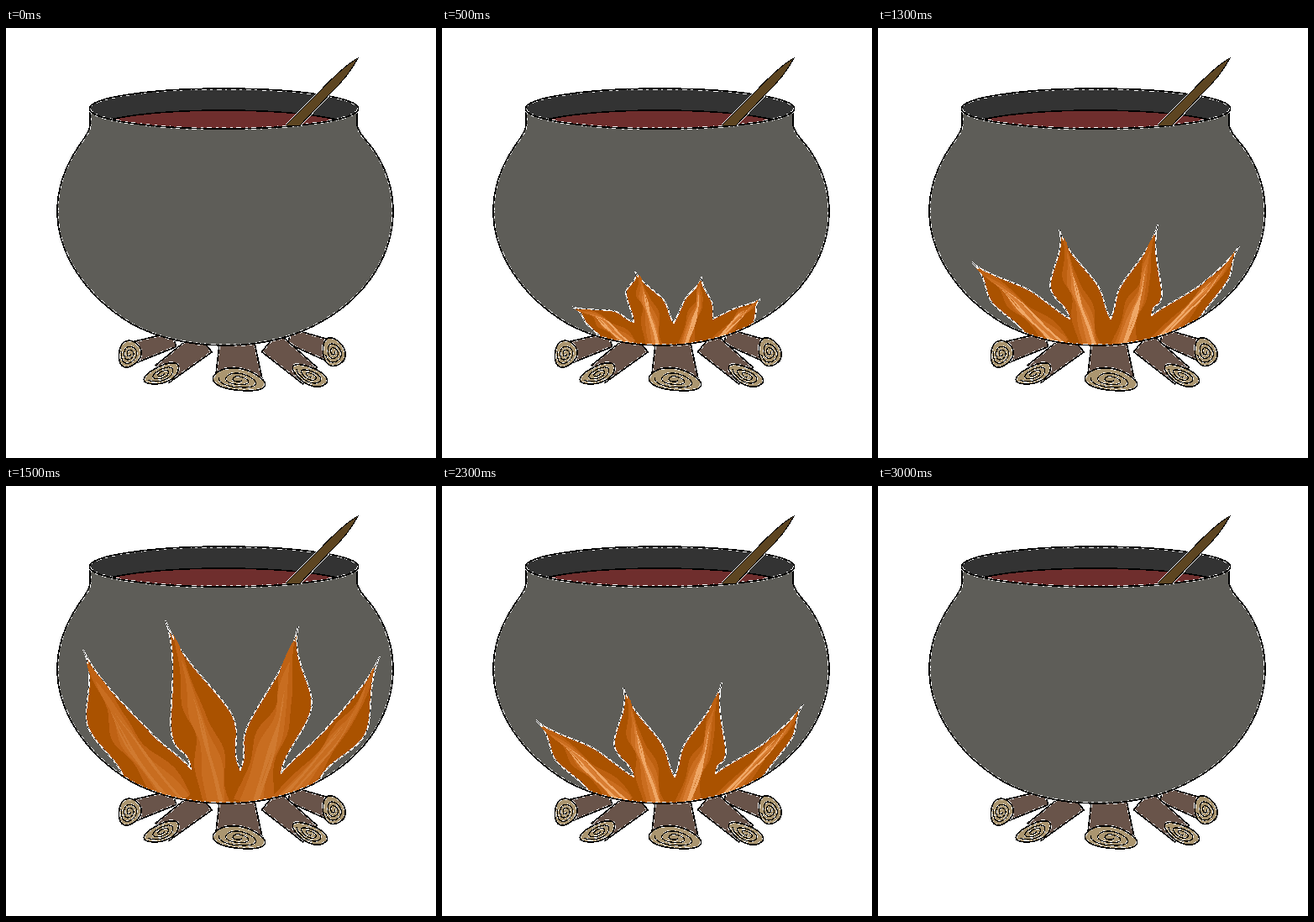
Recreate the animation shown at these times as an HTML page. Size 512 px wide and 512 px high, loop 3.5 s.

```html
<!DOCTYPE html>
<html lang="en">
<head>
<meta charset="utf-8">
<title>Cauldron</title>
<style>
  html, body { margin: 0; width: 100%; height: 100%; overflow: hidden; background: #fff; }
  svg { display: block; width: 100vw; height: 100vh; shape-rendering: crispEdges; }
  .ink, .fleck { fill: none; stroke-linejoin: round; }
  .ink { stroke: #000; stroke-width: 1.6; }
  .fleck { stroke: #fff; stroke-width: 3; stroke-dasharray: 6 4 3 5; }
  .stage { visibility: hidden; animation: 3500ms step-end infinite; }
  #ember { animation-name: ember; }
  #low { animation-name: low; }
  #mid { animation-name: mid; }
  #high { animation-name: high; }
  @keyframes ember {
    0%, 85.7143% { visibility: visible; }
    14.2857%, 100% { visibility: hidden; }
  }
  @keyframes low {
    0%, 28.5714%, 85.7143%, 100% { visibility: hidden; }
    14.2857%, 71.4286% { visibility: visible; }
  }
  @keyframes mid {
    0%, 42.8571%, 71.4286%, 100% { visibility: hidden; }
    28.5714%, 57.1429% { visibility: visible; }
  }
  @keyframes high {
    0%, 57.1429%, 100% { visibility: hidden; }
    42.8571% { visibility: visible; }
  }
</style>
</head>
<body>
<svg viewBox="0 0 512 512">
  <defs>
    <path id="body" d="M100 97V116C99 126 91 133 85 143C70 166 61 190 61 218C61 268 94 319 149 352C184 371 225 378 262 378C304 378 345 368 377 349C430 319 461 270 461 218C461 190 451 164 437 144C429 133 420 126 418 116V97"/>
    <ellipse id="rim" cx="259.5" cy="96" rx="160" ry="24"/>
    <ellipse id="soup" cx="259" cy="122" rx="160" ry="24"/>
    <path id="stick" d="M333 116L372 77Q402 45 419 36Q408 57 388 76L350 116"/>
    <clipPath id="inPot"><use href="#body"/></clipPath>
    <clipPath id="inRim"><use href="#rim"/></clipPath>
  </defs>
  <g id="logs"></g>
  <path id="ember" class="stage" d="M143 346L178 361L165 360Z" fill="#a4561c"/>
  <use href="#body" fill="#5e5d58"/>
  <g id="low" class="stage"></g>
  <g id="mid" class="stage"></g>
  <g id="high" class="stage"></g>
  <use href="#body" class="fleck"/>
  <use href="#body" class="ink"/>
  <use href="#rim" fill="#333"/>
  <g clip-path="url(#inRim)">
    <use href="#soup" fill="#6f2e2d"/>
    <use href="#soup" class="ink"/>
  </g>
  <use href="#rim" class="fleck"/>
  <use href="#rim" class="ink"/>
  <use href="#stick" fill="#5d4521" stroke="#fff" stroke-width="2.6"/>
  <use href="#stick" fill="#5d4521" stroke="#000" stroke-width="1"/>
</svg>
<script>
const $ = id => document.getElementById(id);
const draw = (d, attrs) => `<path d="${d}" ${attrs}/>`;
const fill = color => `fill="${color}"`;
const mix = (a, b, t) => [a[0] + (b[0] - a[0]) * t, a[1] + (b[1] - a[1]) * t];
const line = pts => 'M' + pts.map(p => p.map(v => v.toFixed(1))).join('L');

function seeded(seed) {
  return () => (seed = seed * 16807 % 2147483647) / 2147483647;
}

const outlined = (d, color) =>
  draw(d, fill(color)) + draw(d, 'class="fleck"') + draw(d, 'class="ink"');

// Tapered, wavy band from base to tip, bending through mid.
function band({ base, mid, tip }, width, shift, reach, phase) {
  const left = [], right = [], steps = 24;
  const point = t => {
    const a = mix(base, mid, t), b = mix(mid, tip, t);
    return mix(mix(a, mid, t), mix(mid, b, t), t);
  };
  for (let i = 0; i <= steps; i++) {
    const k = i / steps, t = k * reach, a = point(t), b = point(t + 0.01);
    const len = Math.hypot(b[0] - a[0], b[1] - a[1]) || 1;
    const normal = [(a[1] - b[1]) / len, (b[0] - a[0]) / len];
    const half = width * (1 - k) ** 0.65 * (1 + 0.2 * Math.sin(t * 16 + phase));
    const offset = shift * (1 - t) + Math.sin(t * 11 + phase) * (1 + width * 0.12);
    const side = r => [a[0] + normal[0] * r, a[1] + normal[1] * r];
    left.push(side(offset + half));
    right.unshift(side(offset - half));
  }
  return line(left.concat(right)) + 'Z';
}

// Keys run valley, belly, tip, belly, valley, ... from left to right.
function fire(id, keys, bands, strand, strands) {
  const pts = keys.trim().split(/\s+/).map(p => p.split(',').map(Number));
  const rand = seeded(pts.length + strands);
  let edge = 'M' + pts[0], inside = '';
  for (let i = 0; i + 4 < pts.length; i += 4) {
    const [v1, b1, tip, b2, v2] = pts.slice(i, i + 5);
    const mid = mix(b1, b2, 0.5), tipPull = mix(tip, mid, 0.4);
    const lean = (v, b, k) => [b[0] + (tip[0] - v[0]) * k, b[1] + (tip[1] - v[1]) * k];
    edge += `C${mix(v1, tip, 0.15)} ${lean(v1, b1, -0.15)} ${b1}`
      + `C${lean(v1, b1, 0.15)} ${tipPull} ${tip}`
      + `C${tipPull} ${lean(v2, b2, 0.15)} ${b2}`
      + `C${lean(v2, b2, -0.15)} ${mix(v2, tip, 0.15)} ${v2}`;

    const spine = { base: [262 + ((v1[0] + v2[0]) / 2 - 262) * 0.7, 379], mid, tip };
    const width = Math.hypot(b2[0] - b1[0], b2[1] - b1[1]) * 0.25;
    bands.forEach((color, n) => {
      inside += draw(band(spine, width * (1 - n * 0.33), 0, 0.95 - n * 0.1, i + n), fill(color));
    });
    for (let n = 0; n < strands; n++) {
      const shift = (rand() - 0.5) * width * 0.9;
      inside += draw(band(spine, 0.8 + width * 0.06, shift, 0.45 + rand() * 0.3, rand() * 6), fill(strand));
    }
  }
  edge += 'L340 390H200Z';
  $(id).innerHTML = '<g clip-path="url(#inPot)">'
    + draw(edge, 'fill="#aa5200" stroke="#fff" stroke-width="1.6"')
    + draw(edge, 'fill="none" stroke="#000" stroke-width=".8" stroke-dasharray="3 5"')
    + inside + '</g>';
}

fire('low', `187,366 172,352 155,332 205,337 228,350 219,315 230,290 264,324 276,351
  290,322 309,296 322,328 323,346 348,334 379,323 374,338 371,354`,
  ['#bd6010', '#ca6d1f', '#d87d32'], '#efa766', 3);

fire('mid', `172,360 135,326 112,279 180,312 228,346 205,308 216,240 262,307 277,346
  288,309 333,234 338,318 326,342 385,305 430,260 417,300 382,347`,
  ['#bd6010', '#ca6d1f', '#d87d32'], '#efa766', 3);

fire('high', `140,347 97,285 92,195 172,293 220,336 197,295 190,160 269,272 279,338
  287,287 348,167 364,262 328,341 382,288 445,203 428,295 375,347`,
  ['#bf6214', '#c86d20'], '#d07a30', 3);

// One log: a bar from under the pot to a tilted, rough cut face with a spiral grain.
function log(base, face, baseHalf, faceHalf, rx, ry, tilt) {
  const [dx, dy] = [face[0] - base[0], face[1] - base[1]], len = Math.hypot(dx, dy);
  const side = (p, r) => [p[0] - dy / len * r, p[1] + dx / len * r];
  const bar = line([side(base, baseHalf), side(face, faceHalf),
    side(face, -faceHalf), side(base, -baseHalf)]) + 'Z';
  const cos = Math.cos(tilt), sin = Math.sin(tilt);
  const ring = (a, r) => {
    const k = r * (1 + 0.06 * Math.sin(a * 3 + face[0]));
    const x = rx * k * Math.cos(a), y = ry * k * Math.sin(a);
    return [face[0] + x * cos - y * sin, face[1] + x * sin + y * cos];
  };
  const rim = [], grain = [];
  for (let i = 0; i <= 60; i++) {
    rim.push(ring(i / 60 * Math.PI * 2, 1));
    grain.push(ring(i / 60 * Math.PI * 5, 0.1 + i / 60 * 0.68));
  }
  return outlined(bar, '#69544a') + outlined(line(rim) + 'Z', '#ab9670')
    + draw(line(grain), 'class="fleck" style="stroke-width:2.2"')
    + draw(line(grain), 'class="ink" style="stroke-width:1.2"');
}

$('logs').innerHTML =
  log([200, 371], [147, 388], 9, 13, 13, 16, 0.3) +
  log([338, 367], [390, 386], 9, 13, 13, 17, -0.3) +
  log([236, 374], [186, 412], 15, 13, 22, 10, -0.4) +
  log([314, 374], [362, 414], 15, 13, 22, 10, 0.45) +
  log([275, 376], [277, 419], 21, 28, 31, 13, 0.14);
</script>
</body>
</html>
```
